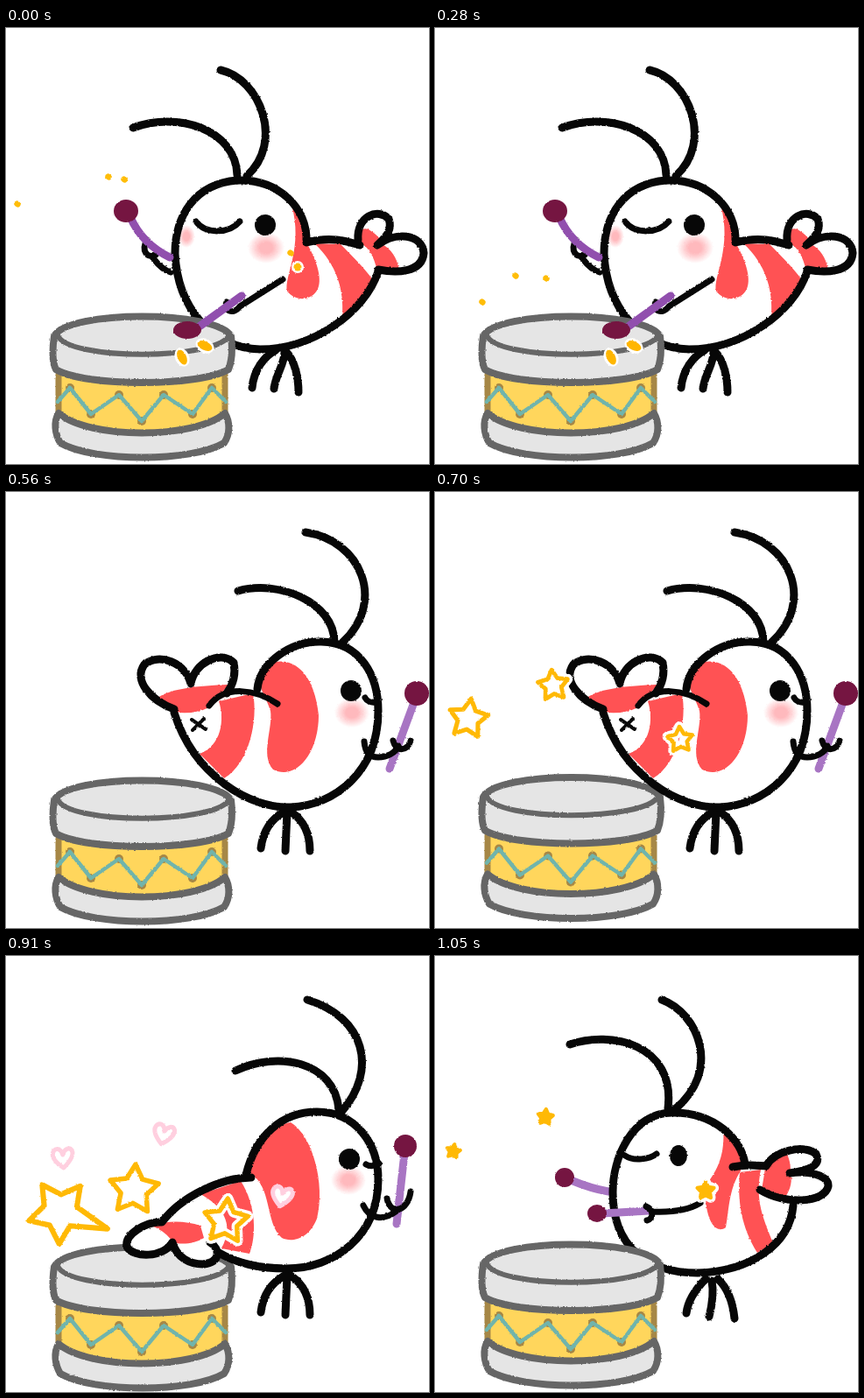
Recreate the animation shown at these times as an HTML page. Size 483 px wide and 498 px high, loop 1.12 s.

```html
<!DOCTYPE html>
<html lang="en">
<head>
<meta charset="utf-8">
<title>Shrimp drummer</title>
<style>
  html, body { margin: 0; width: 100%; height: 100%; overflow: hidden; background: #fff; }
  svg { display: block; width: 483px; height: 498px; }
  path { fill: none; stroke-linecap: round; stroke-linejoin: round; }
  .ink { stroke: #070707; stroke-width: 9; }
  .thin { stroke: #070707; stroke-width: 7; }
  .white { fill: #fff; }
  .red { fill: #ff5254; }
  .pole { stroke: #914fae; stroke-width: 9; }
  .pale { stroke: #a875c3; stroke-width: 9; }
  .rim { stroke: #666; stroke-width: 8; fill: #e5e5e5; }
</style>
</head>
<body>
<svg viewBox="0 0 483 498">
  <defs>
    <filter id="rough" x="0" y="0" width="483" height="498" filterUnits="userSpaceOnUse" color-interpolation-filters="sRGB">
      <feTurbulence type="fractalNoise" baseFrequency=".45" numOctaves="1" seed="4"/>
      <feDisplacementMap in="SourceGraphic" scale="2.5" xChannelSelector="R" yChannelSelector="G"/>
    </filter>
    <radialGradient id="blush">
      <stop offset=".35" stop-color="#ffb9bd"/>
      <stop offset="1" stop-color="#ffb9bd" stop-opacity="0"/>
    </radialGradient>
  </defs>
  <g filter="url(#rough)">
    <g id="back"></g>
    <g id="drum"></g>
    <g id="front"></g>
    <g id="sparks"></g>
  </g>
</svg>
<script>
const STEP = 70, STEPS = 16;
const $ = id => document.getElementById(id);
const p = (cls, d) => `<path class="${cls}" d="${d}"/>`;
const ink = d => p('ink', d), thin = d => p('thin', d);
const white = d => p('white', d), red = d => p('red', d);
const oval = (x, y, rx, ry = rx, fill = '#070707', turn = 0) =>
  `<ellipse cx="${x}" cy="${y}" rx="${rx}" ry="${ry}" fill="${fill}" transform="rotate(${turn} ${x} ${y})"/>`;
const cheek = (x, y, r = 20) => oval(x, y, r, r * .85, 'url(#blush)');
const ball = (x, y, rx, ry) => oval(x, y, rx, ry, '#751541');
const chip = (x, y, turn) => oval(x, y, 11, 8, '#fff', turn) + oval(x, y, 9, 5, '#ffb600', turn);
const move = (x, y, body) => `<g transform="translate(${x} ${y})">${body}</g>`;

const backFeelers = ink('M342 46C405 55 435 125 384 172M265 113C310 100 375 125 375 172');
const backLegs = ink('M318 365C300 375 293 390 291 407M321 365L319 410M325 365C340 375 347 390 347 410');
const midLegs = ink('M309 369C298 380 289 392 287 408M316 371C319 386 316 400 313 412M323 369C335 380 340 395 342 414');
const backArm = p('pale', 'M466 240L438 316') + ball(469, 230, 14)
  + thin('M409 285C410 298 415 303 425 303C435 303 445 298 448 290M442 284C445 297 458 297 462 284');
const leftStrike = p('pole', 'M201 286L152 314');

// Whole body in profile, facing the drum
const sideBody = ink('M245 48C290 58 318 130 275 169M145 114C195 95 262 115 264 168')
  + ink('M308 368C295 375 283 390 281 411M318 370C318 385 308 395 306 412M320 370C330 380 334 400 334 416')
  + white('M264 174C215 178 193 215 193 258C196 320 235 365 290 367C350 367 410 325 425 278C445 280 475 280 477 257C475 235 445 232 432 245C442 232 442 220 437 218C425 205 400 215 402 243L343 245C345 205 310 172 264 174')
  + red('M326 202C340 212 344 230 343 245C353 262 362 285 356 298C350 312 329 313 321 300C317 285 340 250 326 202')
  + red('M352 246L382 247C397 262 410 275 419 288C410 305 398 318 384 328C386 300 378 270 352 246')
  + red('M402 244C403 230 407 228 414 230C422 235 428 240 429 247C440 252 446 262 449 276L424 276C420 265 418 252 402 244')
  + cheek(297, 251, 21) + oval(206, 238, 10, 13, 'url(#blush)')
  + ink('M264 174C215 178 193 215 193 258C196 320 235 365 290 367C350 367 410 325 425 278')
  + ink('M264 174C310 172 345 205 343 245C370 238 388 243 404 248M402 242C400 215 425 205 437 218C442 232 432 240 424 248C445 232 475 235 477 257C475 280 445 280 425 276')
  + oval(296, 225, 12) + thin('M217 221C228 236 255 235 267 221');

// Body turned half way
const midBody =
  white('M270 179C225 180 203 230 203 270C203 330 240 362 300 362C360 360 405 330 409 285L354 240C352 210 320 178 270 179')
  + white('M372 240C388 222 420 215 435 226C442 240 425 245 412 248C425 245 450 250 449 263C445 282 400 285 370 267')
  + red('M329 194C345 208 352 225 353 240C335 262 336 290 332 310C320 319 307 300 309 262C327 240 331 220 329 194')
  + red('M348 247L372 244C365 280 375 300 386 328L368 339C350 310 345 280 348 247')
  + red('M377 243C385 232 392 225 401 224C406 235 406 240 406 249C409 260 403 272 399 276L373 267')
  + ink('M270 179C225 180 203 230 203 270C203 330 240 362 300 362C360 360 405 330 409 285M270 179C320 178 350 210 354 238')
  + ink('M340 241C360 237 370 240 378 240C388 222 420 215 435 226C442 240 425 245 405 248C425 245 450 250 449 263C445 282 400 285 371 267')
  + oval(278, 228, 10, 12) + thin('M217 228C227 235 245 232 253 226');

const poses = {
  right: {
    back: sideBody,
    front: thin('M161 242C154 254 161 264 171 259M168 263C175 272 181 277 188 279')
      + p('pole', 'M142 216C151 237 165 251 187 262') + ball(137, 209, 14, 13)
      + thin('M316 287L267 318C260 328 247 323 252 313')
      + p('pole', 'M222 340L269 306') + ball(207, 345, 16, 10)
      + chip(201, 376, 65) + chip(227, 363, 25)
  },
  left: {
    back: leftStrike + sideBody,
    front: ball(144, 318, 15, 11) + p('pole', 'M238 270L284 288') + ball(230, 267, 13)
      + thin('M316 287C303 299 285 303 273 294C266 288 267 280 272 278')
  },
  mid: {
    back: ink('M259 50C300 65 328 130 274 175M154 101C200 85 275 100 266 174')
      + midLegs + p('pale', 'M198 269C180 266 167 261 155 256') + midBody,
    front: ball(148, 253, 11) + p('pale', 'M244 291L192 294') + ball(185, 294, 11, 10)
      + thin('M303 282C290 290 270 293 248 292M241 286C250 290 250 300 242 302')
  },
  leave: {
    back: ink('M268 55C315 65 342 130 284 167M169 100C215 88 280 105 278 166') + midLegs
      + leftStrike
      + white('M285 172C235 172 203 220 203 265C203 330 240 368 300 368C352 368 393 330 402 275C425 273 448 262 445 238C440 218 412 215 403 232C408 222 398 212 390 210C372 208 370 220 376 240L365 248C362 205 335 172 285 172')
      + red('M346 209C360 220 365 240 366 260C358 280 368 290 360 307C348 308 346 295 348 275C352 250 348 230 346 209')
      + red('M367 258L399 278C397 291 392 302 384 310C388 288 372 278 367 258')
      + red('M373 243C378 231 388 228 400 234C410 244 424 246 432 265L402 274C395 262 383 256 369 252')
      + cheek(322, 253) + oval(216, 239, 8, 11, 'url(#blush)')
      + ink('M285 172C235 172 203 220 203 265C203 330 240 368 300 368C352 368 393 330 402 274')
      + ink('M285 172C335 172 364 205 365 260M366 248C372 246 376 244 382 243M378 237C362 212 380 205 394 211C404 217 402 227 397 233C412 215 440 218 445 238C448 262 425 273 402 274')
      + oval(321, 230, 12) + thin('M233 226C245 239 270 240 286 229'),
    front: ball(144, 316, 14, 12) + p('pole', 'M264 276C290 282 315 282 333 279') + ball(261, 276, 12)
      + thin('M315 275C327 287 318 292 310 288M322 288C328 299 345 302 349 290C351 285 351 281 350 277')
  },
  turn: {
    back: '',
    front: move(-24, 1, backFeelers) + move(-5, 2, backLegs)
      + `<g transform="translate(624 0) scale(-1 1)">${midBody}</g>` + move(-18, 0, backArm)
  },
  up: {
    back: '',
    front: backFeelers + backLegs
      + white('M287 225C290 195 325 170 360 171C405 172 425 210 425 250C425 320 375 358 325 360C280 362 215 325 192 252C165 240 145 215 158 197C175 183 205 195 211 218C215 195 245 180 260 195C265 210 260 220 252 230')
      + red('M290 205C305 185 350 185 357 255C357 300 330 330 305 317C290 300 305 270 302 250C297 233 287 225 290 205')
      + red('M243 239L282 230C288 260 278 310 249 327L221 299C246 290 250 260 243 239')
      + red('M172 236C185 225 220 221 254 220L234 245C220 252 205 254 191 251')
      + cheek(395, 252)
      + ink('M287 225C290 195 325 170 360 171C405 172 425 210 425 250C425 320 375 358 325 360C280 362 215 325 192 252')
      + ink('M192 248C165 238 145 215 158 197C175 183 205 195 211 219C215 195 245 180 260 195C263 210 258 222 252 230')
      + thin('M232 244C250 220 285 225 310 242')
      + '<path d="M212 260L228 271M226 259L213 272" stroke="#070707" stroke-width="4"/>'
      + oval(394, 227, 12) + thin('M410 235C412 239 417 241 422 240') + backArm
  },
  down: {
    back: '',
    front: ink('M344 50C410 70 425 130 383 178M262 131C310 108 375 120 380 175') + backLegs
      + white('M275 252C285 205 315 178 355 178C400 178 425 215 425 255C425 320 375 357 320 357C285 357 260 350 242 340C235 353 200 355 190 330C180 345 145 345 138 332C135 318 160 303 180 303C200 275 245 253 275 252')
      + red('M277 247C286 210 310 192 325 190C350 205 365 260 355 300C345 325 325 327 315 322C295 305 305 262 277 247')
      + red('M222 272L268 257C286 285 286 320 278 340L246 334C262 305 246 285 222 272')
      + red('M168 309C185 301 205 303 222 308L226 322C215 329 200 330 191 327C185 319 178 313 168 309')
      + cheek(391, 256)
      + ink('M274 250C285 205 315 178 355 178C400 178 425 215 425 255C425 320 375 357 320 357C285 357 262 350 243 339')
      + ink('M280 253C245 253 200 275 178 304C160 303 135 318 138 332C145 345 180 345 190 327C195 345 210 352 225 352C245 350 245 335 233 327')
      + oval(392, 232, 12) + thin('M411 238C416 241 421 240 426 237')
      + p('pale', 'M455 225L446 306') + ball(456, 217, 13)
      + thin('M408 285C415 300 430 303 445 292M435 277C439 297 459 292 462 269')
  }
};

const zig = [[73, 411], [97, 441], [129, 419], [155, 449], [180, 419], [213, 441], [235, 411]];
$('drum').innerHTML =
  '<path d="M58 385H252V450Q155 485 58 450Z" style="fill:#ffd65c"/>'
  + '<path d="M60 396V439M250 396V439" stroke="#a68746" stroke-width="7"/>'
  + p('rim', 'M60 440C54 450 56 464 62 474C100 496 212 496 249 474C256 464 256 450 250 440C215 470 95 470 60 440Z')
  + p('rim', 'M55 352C70 322 240 322 257 352C259 368 258 380 254 390C220 410 90 410 57 390C52 380 53 366 55 352Z')
  + '<path d="M59 351C70 380 240 380 255 351" stroke="#666" stroke-width="6"/>'
  + zig.map(([x, y]) => oval(x, y, 5, 5, '#a68746')).join('')
  + `<path d="M59 427L${zig.join('L')}L251 427" stroke="#70b4ac" stroke-width="4.5"/>`;

function star(x, y, r, turn, solid, tail) {
  const pts = [];
  for (let i = 0; i < 10; i++) {
    const a = (i * 36 - 90 + turn) * Math.PI / 180;
    const d = i % 2 ? r * .53 : i === 2 ? r * tail : r;
    pts.push((x + d * Math.cos(a)).toFixed(1) + ' ' + (y + d * Math.sin(a)).toFixed(1));
  }
  const d = `M${pts.join('L')}Z`;
  const line = 3.5 + r * .07;
  const fill = solid ? '#ffb905' : 'none';
  return `<path d="${d}" stroke="#fff" stroke-width="${line + 7}"/>`
    + `<path d="${d}" stroke="#ffb905" stroke-width="${line}" style="fill:${fill}"/>`;
}
const heart = (x, y, turn) =>
  `<path transform="translate(${x} ${y}) rotate(${turn})" d="M0 11C-9 4 -14 -3 -10 -9C-6 -13 -1 -10 0 -4C2 -10 8 -13 11 -8C13 -2 7 5 0 11Z" stroke="#ffcfdf" stroke-width="5" style="fill:#fff"/>`;
const dots = list => list.map(([x, y]) => oval(x, y, 3.8, 3.4, '#ffbd08', 35)).join('');

// step, then x, y, radius, turn, stretch of each star
const starKeys = [
  [10, [38, 259, 23, 8, 1], [135, 221, 18, -6, 1], [280, 283, 15, -4, 1]],
  [13, [62, 292, 37, 38, 1.55], [146, 267, 29, 4, 1], [251, 303, 26, 5, 1]],
  [15, [21, 223, 8, 10, 1], [126, 184, 9, 6, 1], [309, 268, 10, 0, 1]]
];
function stars(n) {
  const k = n < 13 ? 0 : 1, a = starKeys[k], b = starKeys[k + 1];
  const t = (n - a[0]) / (b[0] - a[0]);
  return [1, 2, 3].map(i => {
    const [x, y, r, turn, tail] = a[i].map((v, j) => v + (b[i][j] - v) * t);
    return star(x, y, r, turn, n === 15, tail);
  }).join('');
}
function sparks(n) {
  if (n === 0) return dots([[13, 201], [117, 170], [135, 173], [325, 257]])
    + oval(333, 273, 7, 7, '#fff') + oval(333, 273, 4.5, 4.5, '#ffbd08');
  if (n >= 4 && n <= 6) return dots([[54, 313], [92, 283], [127, 286]]);
  if (n < 10) return '';
  const rise = (13 - n) * 9;
  const hearts = n >= 12 && n <= 14
    ? heart(65, 231 + rise, -4) + heart(180, 204 + rise, 14) + heart(315, 275 + rise, 12) : '';
  return stars(n) + hearts;
}

const order = ['right', 'left', 'right', 'left', 'right', 'left', 'leave', 'turn',
  'up', 'down', 'up', 'down', 'up', 'down', 'turn', 'mid'];
const drumDip = { left: 3, down: 3 };
let shown = -1;

function draw(n) {
  const name = order[n];
  $('back').innerHTML = poses[name].back;
  $('front').innerHTML = poses[name].front;
  $('sparks').innerHTML = sparks(n);
  // The drum sinks under a blow and springs up after a tail slap
  const rebound = name === 'up' && order[n - 1] === 'down';
  $('drum').setAttribute('transform', `translate(0 ${rebound ? -3.5 : drumDip[name] || 0})`);
}
const start = performance.now();
function tick() {
  const n = Math.floor((performance.now() - start) / STEP) % STEPS;
  if (n !== shown) draw(shown = n);
  requestAnimationFrame(tick);
}
tick();
</script>
</body>
</html>
```
